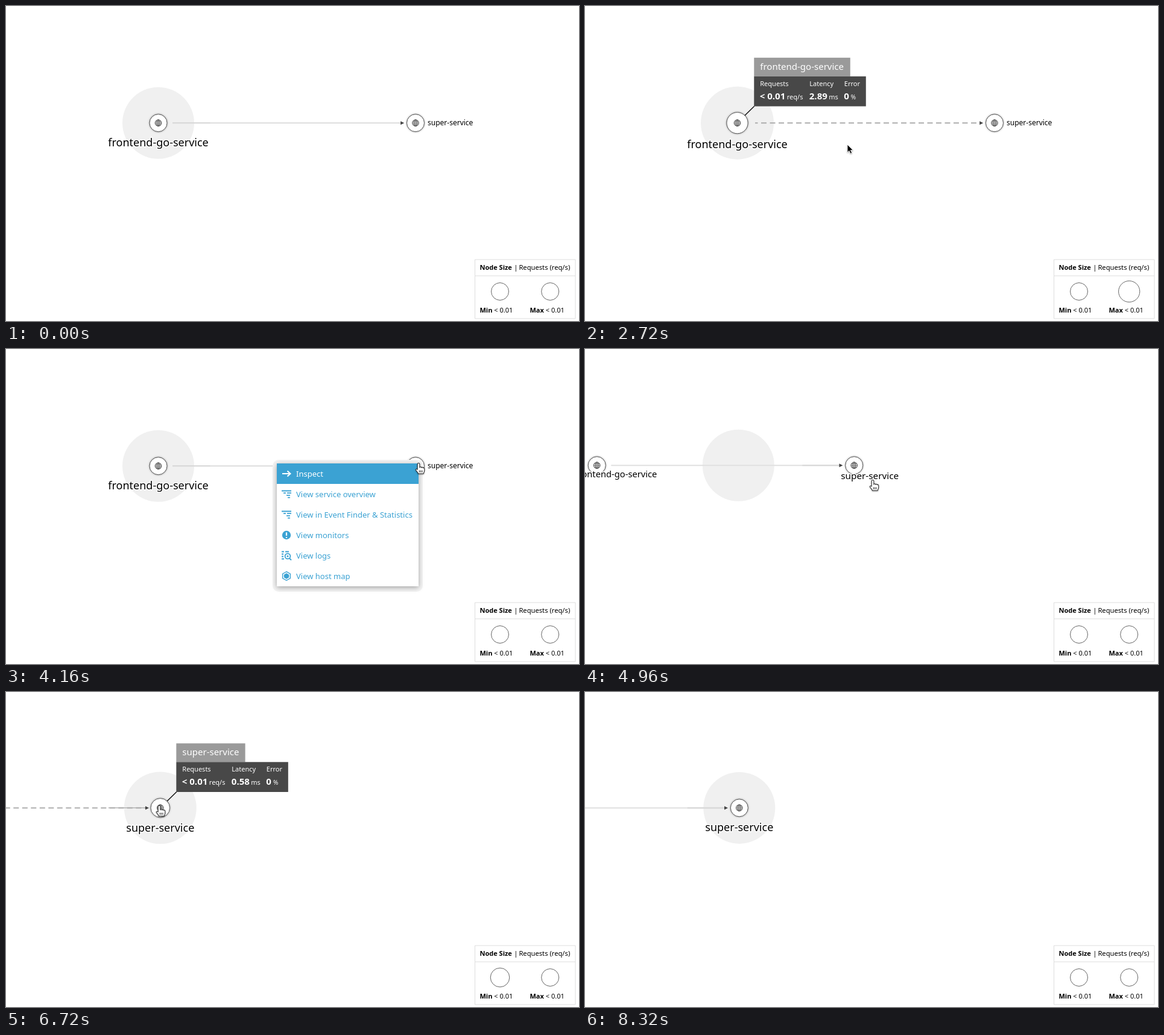
Animation, 950 px wide and 523 px high, one loop 8800 ms. Source, as an HTML page:

```html
<!DOCTYPE html>
<html lang="en">
<head>
<meta charset="utf-8">
<title>Service map</title>
<style>
  html, body { margin: 0; width: 100%; height: 100%; overflow: hidden; background: #fff; }
  svg { display: block; }
  text { font-family: "Noto Sans", "Open Sans", sans-serif; font-size: 11px; }
  .bold { font-weight: 700; }
  .name { text-anchor: middle; paint-order: stroke; stroke: #fff; stroke-width: 3px; stroke-linejoin: round; }
  .disc { fill: #fff; stroke: #555; filter: drop-shadow(0 0 1.5px rgba(0, 0, 0, .4)); }
  .ring { fill: #fff; stroke: #666; }
  .globe { fill: none; stroke: #444; }
  .tip text { fill: #fff; }
  .tip .title { font-size: 15px; }
  .tip .bold { font-size: 15px; }
  .menu text { font-size: 13px; fill: #3ba2d3; }
  .menu .panel { fill: #fff; filter: drop-shadow(0 2px 4px rgba(0, 0, 0, .35)); }
  .line { fill: none; stroke: #3ba2d3; stroke-width: 1.8; }
  .solid { fill: #3ba2d3; }
  #cursor { filter: drop-shadow(0 1px 1px rgba(0, 0, 0, .35)); }
  .hand { fill: #fff; stroke: #222; stroke-width: 1.1; stroke-linejoin: round; }
</style>
</head>
<body>
<svg width="950" height="523" viewBox="0 0 950 523">
  <defs>
    <g id="globe" class="globe">
      <circle r="5.3"/>
      <ellipse rx="2.5" ry="5.3"/>
      <path d="M0-5.3V5.3M-5.3 0H5.3M-4.4-2.8H4.4M-4.4 2.8H4.4" stroke-width=".8"/>
    </g>
    <path id="stairs" class="line" d="M-8-5.5H8M-5-1.8H-1M1-1.8H8M0 1.9H6M2 5.6H6"/>
  </defs>

  <circle id="halo" fill="#f0f0f0"/>
  <path id="edge" fill="none"/>
  <path id="accent" fill="none"/>
  <path id="arrow" d="M0-3L6 0L0 3Z" fill="#444"/>

  <g id="front">
    <circle class="disc"/><use href="#globe"/>
    <text class="name">frontend-go-service</text>
  </g>
  <g id="super">
    <circle class="disc"/><use href="#globe"/>
    <text class="name">super-service</text>
  </g>

  <g id="legend">
    <path d="M777.5 421H944V519H777.5ZM777.5 448H944" fill="#fff" stroke="#ddd"/>
    <text class="bold" x="785.5" y="437.5">Node Size</text>
    <text x="842.2" y="437.5">|</text>
    <text x="850.4" y="437.5" style="font-size:11.2px">Requests (req/s)</text>
    <circle id="min" class="ring" cx="819" cy="474"/>
    <circle id="max" class="ring" cx="902.2" cy="474"/>
    <text x="785.5" y="508.5"><tspan class="bold">Min</tspan> &lt; 0.01</text>
    <text x="868.5" y="508.5"><tspan class="bold">Max</tspan> &lt; 0.01</text>
  </g>

  <path id="lead" stroke="#111" stroke-width="1.5"/>
  <g id="tip" class="tip">
    <rect id="head" height="31" fill="#9a9a9a"/>
    <rect y="31" width="185.5" height="49.7" fill="#484848"/>
    <text id="title" class="title" x="10" y="19.8"></text>
    <text x="10" y="47">Requests</text>
    <text x="92" y="47">Latency</text>
    <text x="149.5" y="47">Error</text>
    <text class="bold" x="9.5" y="68.7">&lt; 0.01</text>
    <text x="54.5" y="68.7">req/s</text>
    <text id="latency" class="bold" x="91.5" y="68.7"></text>
    <text x="124" y="68.7">ms</text>
    <text class="bold" x="149" y="68.7">0</text>
    <text x="160.6" y="68.7" style="font-size:10px">%</text>
  </g>

  <g id="menu" class="menu">
    <rect x="442" y="184" width="249" height="219" rx="10" fill="#f4f4f4"/>
    <rect class="panel" x="449" y="190" width="235" height="204"/>
    <rect class="solid" x="449" y="190" width="235" height="34"/>
    <path d="M458 207H471M466.5 202.5L471.5 207L466.5 211.5" fill="none" stroke="#fff" stroke-width="2"/>
    <use href="#stairs" x="465" y="241"/>
    <use href="#stairs" x="465" y="275"/>
    <circle class="solid" cx="465" cy="309" r="7.2"/>
    <path d="M465 304.5V310M465 312V314" stroke="#fff" stroke-width="2.2"/>
    <path class="line" d="M457 336.5H461M463 336.5H469M457 340.5H460M457 344.5H460M457 348.5H461M470 347.5L473 350.5"/>
    <circle class="line" cx="467" cy="344" r="4.4"/>
    <circle class="solid" cx="467" cy="344" r="1.6"/>
    <path class="line" style="stroke-width:1.4" d="M465 369.7L471.4 373.3V380.7L465 384.3L458.6 380.7V373.3Z"/>
    <path class="solid" d="M465 372.3L469.2 374.7V379.3L465 381.7L460.8 379.3V374.7Z"/>
    <text x="481" y="211.8" style="fill:#fff">Inspect</text>
    <text x="481" y="245.8">View service overview</text>
    <text x="481" y="279.8">View in Event Finder &amp; Statistics</text>
    <text x="481" y="313.8">View monitors</text>
    <text x="481" y="347.8">View logs</text>
    <text x="481" y="381.8">View host map</text>
  </g>

  <g id="cursor">
    <path id="pointer" d="M0 0V13.2L3 10.4L5.2 15.2L7.6 14.1L5.4 9.5H9.4Z" fill="#000" stroke="#fff" stroke-width=".9"/>
    <g id="finger" class="hand" transform="scale(.92)">
      <path d="M-2 1.5a2 2 0 0 1 4 0V7.5c0-1.6 3.2-1.6 3.2.3 0-1.4 3-1.3 3 .6 0-1.2 2.4-1 2.4 1v3.6c0 2-1.3 3-1.6 5.5H-.5c-1-2.6-2.6-4-4.5-6.5-.8-1.2.8-2.6 2-1.4L-2 11Z"/>
      <path d="M1.5 12.5V16M4 12.5V16M6.5 12.5V16" fill="none"/>
    </g>
    <g id="palm" class="hand">
      <path d="M-4.6 9C-5.6 6-8 3.4-8 1.6c0-1.5 1.8-1.5 2.6-.2l1 1.4L-5.6-4.6c-.5-2 2-2.8 2.6-.8l.6 2V-7c0-2 3-2 3 0v1c0-2 3-2 3 0v1.6c.2-1.6 2.8-1.6 2.8.4V2c0 3-1.6 4-1.6 7Z"/>
      <path d="M-2.4-3.5V0M.6-6V0M3.6-4.5V0M-1.5 3.5V7M1 3.5V7M3.4 3.5V7" fill="none"/>
    </g>
  </g>
</svg>

<script>
  const LOOP = 8800, STEP = 160, REST = 14.5, GROW = 3.1;
  const $ = id => document.getElementById(id);
  const lerp = (a, b, p) => a + (b - a) * p;
  const set = (el, attrs) => { for (const k in attrs) el.setAttribute(k, attrs[k]); };
  const show = (el, on) => el.style.display = on ? '' : 'none';
  const within = (t, a, b) => t >= a && t < b;

  // Linear value along [time, ...values] keys
  function track(t, keys, i = 1) {
    const n = keys.findIndex(k => k[0] > t);
    if (n < 0) return keys[keys.length - 1][i];
    if (n === 0) return keys[0][i];
    const a = keys[n - 1], b = keys[n];
    return lerp(a[i], b[i], (t - a[0]) / (b[0] - a[0]));
  }

  const route = [
    [160, 474, 411], [320, 400, 360], [480, 290, 285], [640, 244, 256], [800, 244, 256],
    [1280, 250, 196], [2400, 250, 196], [2560, 330, 211], [2720, 435, 230],
    [2880, 560, 216], [3040, 650, 200], [3200, 684, 190], [4160, 684, 190],
    [4640, 477, 218], [5760, 477, 218], [5920, 425, 212], [6080, 330, 200],
    [6240, 254, 189], [7680, 254, 189], [7840, 270, 265], [8000, 295, 365], [8160, 320, 480]
  ];
  const growFront = [[1440, 0], [1600, .42], [1760, .8], [1920, 1], [2880, 1], [3040, .5], [3200, 0]];
  const growSuper = [[3360, 0], [3520, .5], [3680, 1], [3840, 1], [4160, 0],
    [6560, 0], [6720, .42], [6880, .8], [7040, 1], [7840, 1], [8160, .2], [8320, 0]];
  const pan = [[4640, 0], [4800, .15], [4960, .55], [5120, .9], [5280, 1]];

  // focus: 0 = small label at the right, 1 = large label below
  function node(el, x, y, grow, focus) {
    const r = REST + GROW * grow;
    set(el, { transform: `translate(${x} ${y})` });
    set(el.querySelector('circle'), { r });
    const label = el.querySelector('text');
    set(label, { x: lerp(57.7, 0, focus), y: lerp(3.6, 38.6 + GROW * grow, focus) });
    label.style.fontSize = lerp(12, 18, focus) + 'px';
  }

  function edge(t, fx, sx, y, grow, active, p) {
    const start = fx + 23.5 + (active ? 6 : 0), end = sx - 23;
    set($('edge'), {
      d: `M${start} ${y}H${end}`,
      stroke: active ? '#adadad' : p > .5 ? '#e0e0e0' : '#d4d4d4',
      'stroke-width': active || p > .5 ? 2 : 1.5,
      'stroke-dasharray': active ? '9 5.5' : 'none',
      'stroke-dashoffset': -t / STEP * 4
    });
    const from = p > .5 ? sx - 86 : start;
    set($('accent'), {
      d: `M${from} ${y}h62.5`,
      stroke: active ? '#a8a8a8' : '#d8d8d8', 'stroke-width': active ? 1.4 : 2
    });
    show($('accent'), !active || p > .5);
    set($('arrow'), { transform: `translate(${sx - 24.8} ${y})` });
  }

  function tooltip(x, y, grow, name, latency, width) {
    const d = GROW * grow, left = x + 25.6 + d * .7, top = y - 106.2 - d * .7;
    const k = (REST + d) * .71;
    set($('tip'), { transform: `translate(${left} ${top})` });
    set($('head'), { width });
    $('title').textContent = name;
    $('latency').textContent = latency;
    set($('lead'), { d: `M${x + k} ${y - k}L${left + .5} ${top + 80.5}` });
  }

  function cursor(t) {
    show($('cursor'), within(t, 160, 8320));
    set($('cursor'), { transform: `translate(${track(t, route)} ${track(t, route, 2)})` });
    const palm = within(t, 1280, 2560);
    const finger = within(t, 3200, 5760) || within(t, 6240, 7840);
    show($('palm'), palm);
    show($('finger'), finger);
    show($('pointer'), !palm && !finger);
  }

  function draw(t) {
    const p = track(t, pan), gf = track(t, growFront), gs = track(t, growSuper);
    const fx = lerp(252.5, -170.7, p), sx = lerp(679, 255.8, p), y = lerp(194.2, 192.4, p);
    const active = gf > 0 || gs > 0;

    set($('halo'), { cx: lerp(252.5, 255.8, p), cy: y, r: 59.5 + (p ? gs : gf) });
    edge(t, fx, sx, y, gf, active, p);
    node($('front'), fx, y, gf, 1 - p);
    node($('super'), sx, y, gs, p);
    set($('max'), { r: REST + GROW * gf });
    set($('min'), { r: REST + GROW * gs });

    const overFront = within(t, 1440, 3040);
    const overSuper = within(t, 3360, 4000) || within(t, 6560, 8160);
    show($('tip'), overFront || overSuper);
    show($('lead'), overFront || overSuper);
    if (overFront) tooltip(fx, y, gf, 'frontend-go-service', '2.89', 159.5);
    if (overSuper) tooltip(sx, y, gs, 'super-service', '0.58', 114.3);

    show($('menu'), within(t, 4000, 4800));
    cursor(t);
  }

  const begin = performance.now();
  function tick() {
    const t = (performance.now() - begin) % LOOP;
    draw(Math.floor(t / STEP) * STEP);
    requestAnimationFrame(tick);
  }
  tick();
</script>
</body>
</html>
```
